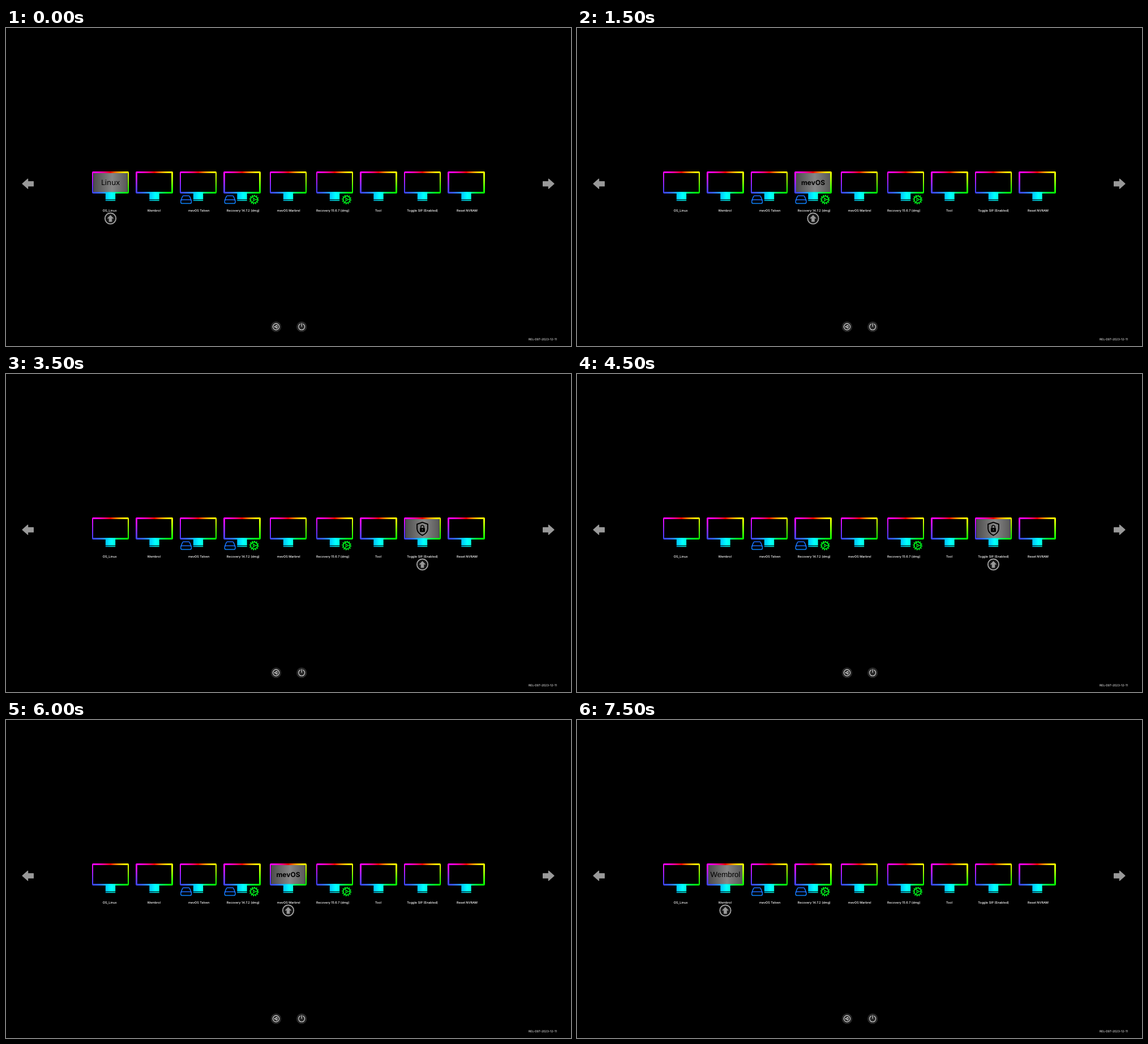
Recreate the animation shown at these times as an HTML page. Size 998x561 px, loop 8000 ms.

```html
<!DOCTYPE html>
<html lang="en">
<head>
<meta charset="utf-8">
<title>Boot picker</title>
<style>
  html, body { margin: 0; width: 100%; height: 100%; overflow: hidden; background: #000; }
  #stage { position: absolute; left: 0; top: 0; width: 998px; height: 561px; overflow: hidden; }
  svg { position: absolute; left: 0; top: 0; }
  .frame {
    position: absolute; top: 253.3px; width: 65.5px; height: 38.7px; border-radius: 2px;
    background: conic-gradient(#f00, #ff0 59deg, #0f0 121deg, #0ff 180deg, #3c46ff 239deg, #f0f 301deg, #f00);
  }
  .frame::after { content: ""; position: absolute; inset: 2.7px; background: #000; }
  text { text-anchor: middle; text-rendering: geometricPrecision; }
  .label { font: 500 5.5px Inter, sans-serif; fill: #fff; }
  .version { font: 400 5.2px Inter, sans-serif; fill: #fff; }
  .linux { font: 500 13px "Noto Sans", "Open Sans", sans-serif; }
  .plain { font: 400 13.3px "Liberation Sans", sans-serif; }
  .bold { font: 700 12px Inter, sans-serif; }
</style>
</head>
<body>
<div id="stage">
  <div id="frames"></div>
  <svg width="998" height="561" viewBox="0 0 998 561">
    <defs>
      <linearGradient id="stand">
        <stop offset="0" stop-color="#00c4ff"/>
        <stop offset=".6" stop-color="#0ff"/>
        <stop offset="1" stop-color="#00ffe0"/>
      </linearGradient>
      <linearGradient id="glow">
        <stop offset="0" stop-color="#4c4c4c"/>
        <stop offset=".55" stop-color="#868686"/>
        <stop offset="1" stop-color="#585858"/>
      </linearGradient>
      <linearGradient id="blue" x2="0" y2="1">
        <stop offset="0" stop-color="#1f6cff"/>
        <stop offset="1" stop-color="#0c86ff"/>
      </linearGradient>

      <g id="base" fill="url(#stand)">
        <rect x="-8.7" y="289.5" width="17.4" height="12.9"/>
        <rect x="-8.7" y="303.6" width="17.4" height="1.4"/>
      </g>
      <g id="drive" fill="none" stroke="url(#blue)" stroke-width="1.5" stroke-linejoin="round">
        <path d="M-9.2 304 L-6.4 297.4 Q-5.8 296 -4.4 296 H4.4 Q5.8 296 6.4 297.4 L9.2 304"/>
        <rect x="-9.3" y="303" width="18.6" height="6.6" rx="2.4"/>
        <path d="M4.6 306.4 H6.4" stroke-linecap="round"/>
      </g>
      <g id="gear" fill="none" stroke="#00ff1e" stroke-width="1.5">
        <circle r="6"/>
        <circle r="7.5" stroke-width="1.9" pathLength="24" stroke-dasharray="1 1"/>
        <circle r="1.7" stroke-width="1.1"/>
        <path d="M1.7 0 H6 M-.85 1.5 L-3 5.2 M-.85 -1.5 L-3 -5.2" stroke-width="1.2"/>
      </g>
      <path id="arrow" d="M29 274.8 L38.6 266.3 V270.9 H48.4 V278.9 H38.6 V283.3 Z"
        fill="#999" stroke="#999" stroke-width="1.2" stroke-linejoin="round"/>

      <g id="shield">
        <path d="M0 -11.3 L9.4 -8 V0 Q9 7.4 0 11.7 Q-9 7.4 -9.4 0 V-8 Z" fill="none"
          stroke="#000" stroke-width="1.9" stroke-linejoin="round"/>
        <rect x="-4.5" y="-1.4" width="9" height="7.2" rx="1"/>
        <path d="M-2.7 -1 V-3.3 A2.7 2.7 0 0 1 2.7 -3.3 V-1" fill="none" stroke="#000" stroke-width="1.5"/>
        <circle cy="2" r="1" fill="#777"/>
      </g>
      <g id="wrench" fill="none" stroke="#000">
        <path d="M-7 8 L3 -3" stroke-width="4" stroke-linecap="round"/>
        <path d="M4.6 -9.2 A4.6 4.6 0 1 0 9 -4.4" stroke-width="3"/>
      </g>
      <g id="reset" fill="none" stroke="#000" stroke-width="2.2">
        <path d="M-6.4 -5.4 A8.4 8.4 0 1 1 -8.4 0"/>
        <path d="M-9.6 -9.6 V-3.4 H-3.4 Z" fill="#000" stroke="none"/>
      </g>
    </defs>

    <g id="items"></g>

    <g id="pointer">
      <circle cy="336" r="9.7" fill="#161616" stroke="#aaa" stroke-width="1.7"/>
      <path d="M0 330.3 L5.2 335.8 H2.4 V341.6 H-2.4 V335.8 H-5.2 Z" fill="#999"
        stroke="#999" stroke-width=".8" stroke-linejoin="round"/>
    </g>

    <use href="#arrow"/>
    <use href="#arrow" transform="translate(997 0) scale(-1 1)"/>

    <g fill="none" stroke="#ddd" stroke-width="1.1" stroke-linejoin="round" stroke-linecap="round">
      <g transform="translate(477 527)">
        <circle r="9.2" fill="#292929" stroke="none"/>
        <circle r="5.6"/>
        <path d="M-2.9 0 L1.8 -2.6 V2.6 Z"/>
      </g>
      <g transform="translate(522.2 527)">
        <circle r="9.2" fill="#292929" stroke="none"/>
        <path d="M-2.6 -4.8 A5.5 5.5 0 1 0 2.6 -4.8 M0 -6 V-.6"/>
      </g>
    </g>
    <text class="version" x="948" y="550.5">REL-097-2023-12-11</text>
  </svg>
</div>
<script>
  const STEP = 500;
  const word = (cls, str) => `<text class="${cls}" y="277">${str}</text>`;
  const icon = id => `<use href="#${id}" y="273"/>`;
  const system = word("bold", "mevOS");

  // centre, label, label centre, screen content, badges
  const entries = [
    [184.5, "OS_Linux", 183.2, word("linux", "Linux"), ""],
    [262, "Wembrol", 261.3, word("plain", "Wembrol"), ""],
    [339.5, "mevOS Talven", 340.8, system, "d"],
    [417, "Recovery 14.7.2 (dmg)", 418.8, system, "dg"],
    [498.5, "mevOS Marbrel", 499.2, system, ""],
    [580.5, "Recovery 15.6.7 (dmg)", 577.3, system, "g"],
    [658, "Tool", 657.5, icon("wrench"), ""],
    [735.5, "Toggle SIP (Enabled)", 735.5, icon("shield"), ""],
    [813, "Reset NVRAM", 814.5, icon("reset"), ""]
  ];

  const byId = id => document.getElementById(id);
  byId("frames").innerHTML = entries
    .map(([x]) => `<div class="frame" style="left:${x - 32.75}px"></div>`).join("");
  byId("items").innerHTML = entries.map(([x, label, labelX, content, badges]) => `
    <g transform="translate(${x} 0)">
      <use href="#base"/>
      ${badges.includes("d") ? '<use href="#drive" x="-21.4"/>' : ""}
      ${badges.includes("g") ? '<use href="#gear" x="21.2" y="302.6"/>' : ""}
      <g class="screen" visibility="hidden">
        <rect x="-30.1" y="256" width="60.2" height="33.4" fill="url(#glow)"/>
        ${content}
      </g>
    </g>
    <text class="label" x="${labelX}" y="323.5">${label}</text>`).join("");

  const screens = document.querySelectorAll(".screen");
  const pointer = byId("pointer");
  const last = entries.length - 1;
  let shown = -1;

  // The selection walks to the last entry and back, one entry per step.
  function draw(time) {
    const step = Math.floor(time / STEP) % (2 * last);
    const index = last - Math.abs(last - step);
    if (index !== shown) {
      screens.forEach((s, i) => s.setAttribute("visibility", i === index ? "visible" : "hidden"));
      pointer.setAttribute("transform", `translate(${entries[index][0]} 0)`);
      shown = index;
    }
  }

  function tick() {
    draw(performance.now() - start);
    requestAnimationFrame(tick);
  }
  const start = performance.now();
  tick();
</script>
</body>
</html>
```
